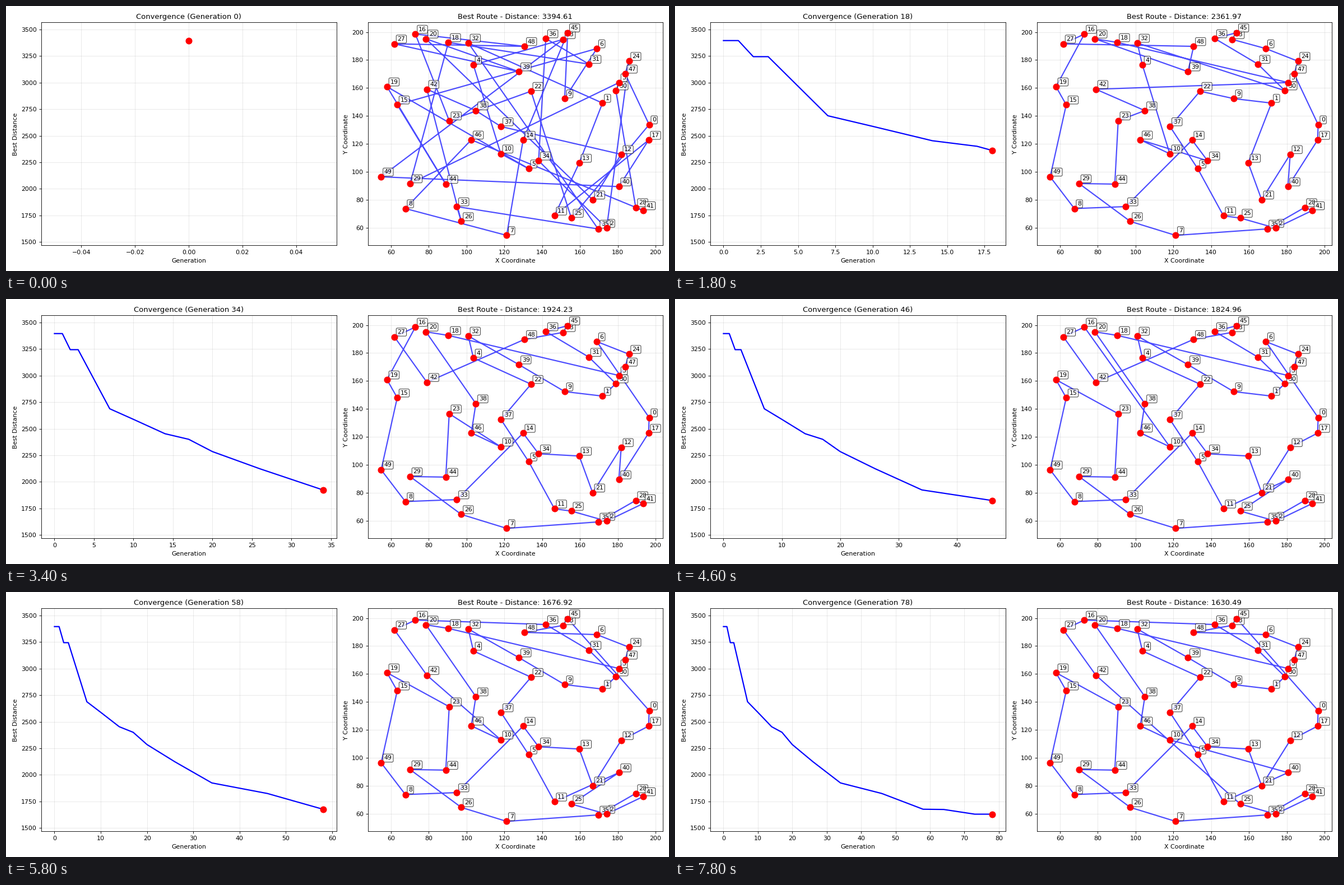
Recreate the animation shown at these times as a matplotlib script. Size 1183 by 473 pixels, loop 8 s.

```python
import itertools
import math

import matplotlib.pyplot as plt
import numpy as np
from matplotlib.animation import FuncAnimation

W, H = 1183, 473
DPI = W / 15
FRAMES, STEP_MS, GENS_PER_FRAME = 40, 200, 2
LAST_GEN = (FRAMES - 1) * GENS_PER_FRAME

CITIES = [
    (196.6, 133.8), (171.9, 149.2), (174.1, 59.7), (180.7, 163.9),
    (103.6, 176.5), (132.9, 102.2), (168.9, 188.2), (121.2, 54.5),
    (67.6, 73.7), (151.9, 152.4), (118.1, 112.9), (146.5, 68.5),
    (181.8, 112.5), (159.6, 106.3), (129.9, 122.7), (63.3, 148.0),
    (72.9, 198.6), (196.3, 122.7), (90.4, 192.6), (57.9, 160.9),
    (78.5, 195.2), (166.7, 80.0), (134.1, 157.7), (90.8, 136.6),
    (185.9, 179.2), (155.4, 66.9), (97.2, 64.5), (61.8, 191.6),
    (189.5, 74.5), (70.1, 91.6), (179.0, 158.1), (164.7, 177.1),
    (100.9, 192.2), (94.8, 75.1), (138.1, 107.9), (169.6, 59.1),
    (141.9, 195.4), (118.2, 132.4), (104.9, 143.8), (127.7, 171.7),
    (180.6, 89.4), (193.5, 72.3), (79.0, 159.1), (151.1, 194.8),
    (89.0, 91.2), (153.5, 199.6), (102.5, 122.9), (183.9, 170.1),
    (130.7, 189.8), (54.8, 96.4)]

FIRST_TOUR = [
    9, 6, 15, 44, 19, 5, 10, 4, 43, 49, 40, 17, 11, 13, 1, 32, 35, 33, 26, 42,
    38, 37, 12, 21, 20, 39, 27, 48, 16, 23, 22, 25, 0, 47, 24, 2, 34, 36, 31,
    18, 29, 3, 30, 28, 41, 46, 8, 7, 14, 45]
LAST_TOUR = [
    16, 27, 42, 25, 2, 41, 28, 35, 7, 26, 29, 44, 23, 19, 15, 49, 8, 33, 14,
    34, 13, 21, 12, 17, 0, 45, 43, 48, 6, 24, 47, 3, 18, 20, 38, 46, 10, 40,
    11, 5, 37, 22, 4, 32, 39, 9, 1, 30, 31, 36]

# Corners of the convergence curve: generation, best distance
CORNERS = [
    (0, 3394.61), (1, 3394.61), (2, 3243.27), (3, 3243.27), (7, 2687.55),
    (10, 2588.08), (14, 2452.83), (17, 2400.5), (20, 2284.92), (26, 2123.49),
    (34, 1924.23), (46, 1824.96), (58, 1676.92), (64, 1674.63),
    (73, 1630.49), (78, 1630.49)]
BEST = np.interp(range(LAST_GEN + 1), *zip(*CORNERS))


def edge(a, b):
    return (a, b) if a < b else (b, a)


def gap(a, b):
    return math.dist(CITIES[a], CITIES[b])


def best_reversal(tour, wanted):
    """Segment whose reversal adds most wanted edges, then saves most length."""
    n, best = len(tour), None
    for i, j in itertools.combinations(range(1, n), 2):
        a, b = tour[i - 1], tour[i]
        c, d = tour[j], tour[(j + 1) % n]
        if j - i == n - 2 or edge(a, b) in wanted or edge(c, d) in wanted:
            continue
        gain = (edge(a, c) in wanted) + (edge(b, d) in wanted)
        saved = gap(a, b) + gap(c, d) - gap(a, c) - gap(b, d)
        if best is None or (gain, saved) > best[:2]:
            best = (gain, saved, i, j)
    return best and best[2:]


def improve(tour, goal):
    """All tours on the way to the goal, one reversal apart."""
    wanted = {edge(a, b) for a, b in zip(goal, goal[1:] + goal[:1])}
    steps = [tour]
    for _ in range(2 * len(goal)):
        move = best_reversal(tour, wanted)
        if move is None:
            break
        i, j = move
        tour = tour[:i] + tour[i:j + 1][::-1] + tour[j + 1:]
        steps.append(tour)
    return steps


STEPS = improve(FIRST_TOUR, LAST_TOUR)


def tour_at(gen):
    done = (BEST[0] - BEST[gen]) / (BEST[0] - BEST[-1])
    return STEPS[round(done * (len(STEPS) - 1))]


def padded(values):
    pad = 0.05 * (max(values) - min(values))
    return min(values) - pad, max(values) + pad


fig = plt.figure(figsize=(15, 5.9975), dpi=DPI)


def panel(left, right, xlabel, ylabel, top=29.5, bottom=427.5):
    """Axes whose frame sits at the given pixels, y counted from the top."""
    ax = fig.add_axes([left / W, 1 - bottom / H,
                       (right - left) / W, (bottom - top) / H])
    ax.set(xlabel=xlabel, ylabel=ylabel)
    ax.grid(True, alpha=0.3)
    return ax


ax_conv = panel(62.5, 589.5, "Generation", "Best Distance")
curve, = ax_conv.plot([], [], "b-", linewidth=2)
head, = ax_conv.plot([], [], "ro", markersize=10)
ax_conv.set_ylim(0.9 * BEST[-1], 1.05 * BEST[0])

ax_map = panel(645.5, 1171.5, "X Coordinate", "Y Coordinate")
city_x, city_y = zip(*CITIES)
path, = ax_map.plot([], [], "b-", linewidth=2, alpha=0.7)
ax_map.scatter(city_x, city_y, c="red", s=100, zorder=5)
for n, xy in enumerate(CITIES):
    ax_map.annotate(str(n), xy, xytext=(5, 5), textcoords="offset points",
                    fontsize=10,
                    bbox=dict(boxstyle="round,pad=0.2", facecolor="white",
                              alpha=0.7))
ax_map.set(xlim=padded(city_x), ylim=padded(city_y))


def draw(frame):
    gen = frame * GENS_PER_FRAME
    curve.set_data(range(gen + 1), BEST[:gen + 1])
    head.set_data([gen], [BEST[gen]])
    pad = 0.05 * gen or 0.055
    ax_conv.set_xlim(-pad, gen + pad)
    ax_conv.set_title(f"Convergence (Generation {gen})")

    tour = tour_at(gen)
    path.set_data(*zip(*(CITIES[c] for c in tour + tour[:1])))
    ax_map.set_title(f"Best Route - Distance: {BEST[gen]:.2f}")
    return curve, head, path


anim = FuncAnimation(fig, draw, frames=FRAMES, init_func=lambda: draw(0),
                     interval=STEP_MS, repeat=True, repeat_delay=0)
plt.show()
```
